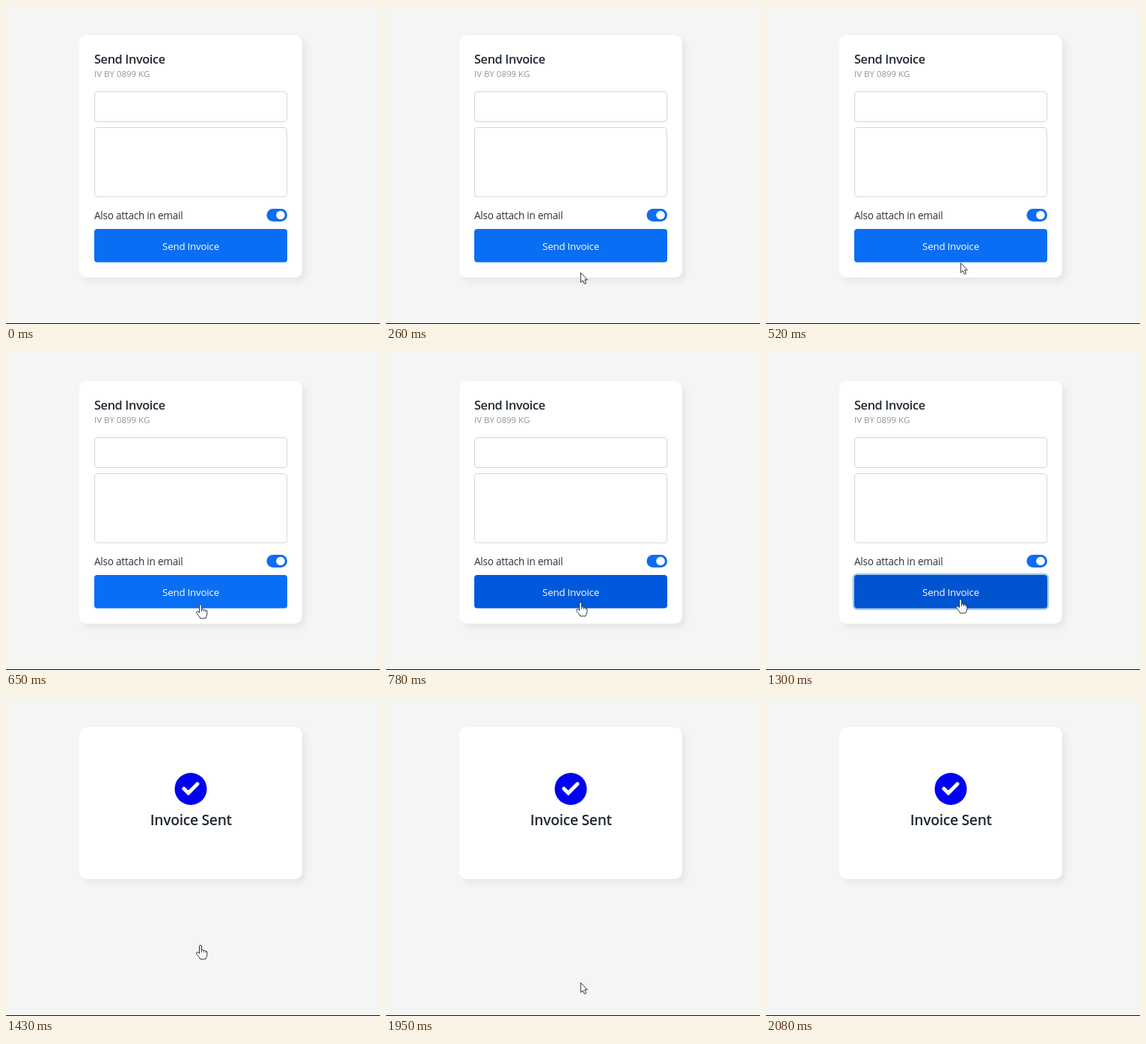
Animation, 500 px wide and 425 px high, one loop 2990 ms. Source, as an HTML page:

```html
<!DOCTYPE html>
<html lang="en">
<head>
<meta charset="utf-8">
<title>Send Invoice</title>
<style>
html, body { margin: 0; width: 100%; height: 100%; overflow: hidden; background: #f5f5f3; }
svg { display: block; width: 100%; height: 100%; font-family: "Open Sans", "Noto Sans", sans-serif; }
.card { fill: #fff; filter: drop-shadow(5px 5px 3px #dce3e5b0); }
.field { fill: #fff; stroke: #d2d5d9; }
.title { font-weight: 600; fill: #212932; }
.cursor { fill: #fff; stroke: #30343a; stroke-linejoin: round; }
</style>
</head>
<body>
<svg viewBox="0 0 500 425">
  <rect width="500" height="425" fill="#f5f5f3"/>
  <g id="form">
    <rect class="card" x="98" y="39" width="298" height="324" rx="10"/>
    <text class="title" x="118" y="77" font-size="16.3" letter-spacing="-.35">Send Invoice</text>
    <text x="118" y="95" font-size="11.5" fill="#8d959c">IV BY 0899 KG</text>
    <rect class="field" x="118.5" y="114.5" width="257" height="40" rx="3.5"/>
    <rect class="field" x="118.5" y="162.5" width="257" height="92.5" rx="3.5"/>
    <text x="118" y="285" font-size="13.6" letter-spacing="-.25" fill="#2b3138">Also attach in email</text>
    <rect x="348.5" y="271" width="27.5" height="17" rx="8.5" fill="#0d6cf0"/>
    <circle cx="367" cy="279.5" r="5.8" fill="#fff"/>
    <rect id="ring" x="117" y="297" width="260" height="46.5" rx="5" fill="none" stroke="#a3c9f2" stroke-width="2.4"/>
    <rect id="button" x="118" y="298" width="258" height="44.5" rx="4"/>
    <text x="247" y="325.5" text-anchor="middle" font-size="13.3" letter-spacing="-.2" fill="#fff">Send Invoice</text>
  </g>
  <g id="sent">
    <rect class="card" x="98" y="39" width="298" height="203" rx="10"/>
    <circle cx="247" cy="121.5" r="21.5" fill="#0000f2"/>
    <path d="M237.8 121.2l6 5.8 12.2-12.2" fill="none" stroke="#fff" stroke-width="5" stroke-linecap="round"/>
    <text class="title" x="247.3" y="170" text-anchor="middle" font-size="19.3" letter-spacing="-.3">Invoice Sent</text>
  </g>
  <!-- both cursors have their hot spot at 0,0 -->
  <path id="arrow" class="cursor" d="M0 0V13L2.9 10.3 5 15 7.3 14 5.3 9.4H9Z"/>
  <g id="hand" class="cursor">
    <path d="M-1.8 1.5Q-1.8 0 -.3 0Q1.2 0 1.2 1.5V6.5Q2.6 5.4 4 7Q5.6 6.2 6.5 7.8Q8.5 7.4 8.5 9.5V13Q8 15.5 6.5 18.5H-.5Q-2.5 15 -5 12.2Q-6.8 9.6 -4.5 9.2Q-3.2 9.2 -1.8 11Z"/>
    <path d="M1.2 6.5V9.5M4 7V9.8M6.5 7.8V10" fill="none" stroke-width=".8"/>
  </g>
  <rect y="424" width="500" height="1" fill="#111"/>
</svg>
<script>
const LOOP = 2990, SENT_AT = 1430, RING_AT = 1300;
const $ = id => document.getElementById(id);
const show = (id, on) => $(id).setAttribute("visibility", on ? "visible" : "hidden");

// start time, cursor, cursor y
const moves = [
  [0, "", 0], [260, "arrow", 356], [390, "arrow", 350], [520, "arrow", 343],
  [650, "hand", 337], [780, "hand", 334], [910, "hand", 332], [1040, "hand", 330],
  [1950, "arrow", 380], [2080, "", 0]
];
// start time, button colour
const shades = [[0, "#096ef4"], [780, "#0059dc"], [910, "#0056d4"], [1040, "#0054d0"]];
const at = (steps, t) => steps.findLast(s => s[0] <= t);

function draw(now) {
  const t = now % LOOP;
  const [, cursor, y] = at(moves, t);
  show("form", t < SENT_AT);
  show("sent", t >= SENT_AT);
  show("ring", t >= RING_AT && t < SENT_AT);
  $("button").setAttribute("fill", at(shades, t)[1]);
  for (const id of ["arrow", "hand"]) {
    show(id, id === cursor);
    $(id).setAttribute("transform", `translate(260.3 ${y + .5})`);
  }
  requestAnimationFrame(() => draw(performance.now() - start));
}
const start = performance.now();
draw(0);
</script>
</body>
</html>
```
